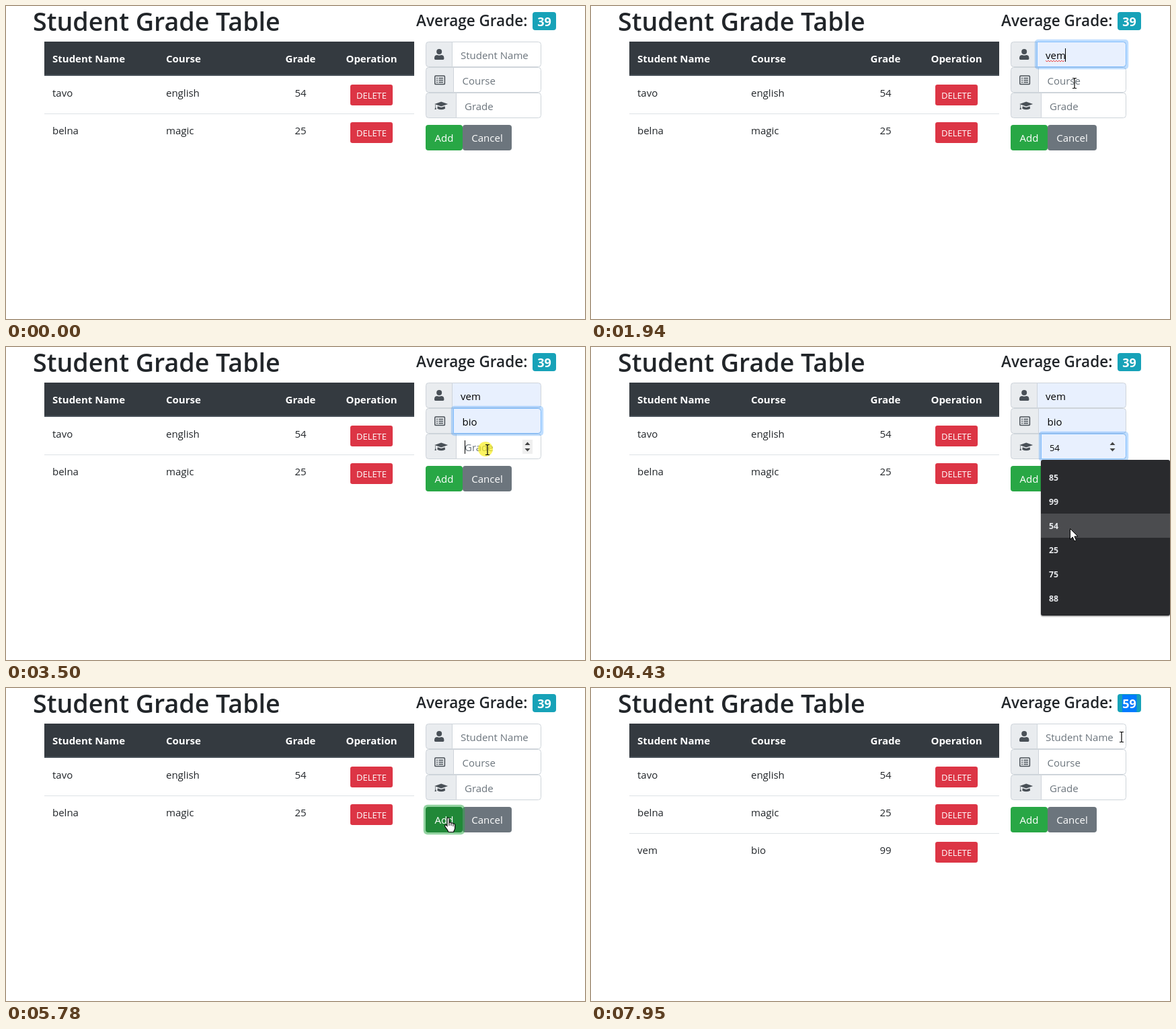
An HTML page that plays this animation: 861x466 px, repeating every 8 s.

```html
<!DOCTYPE html>
<html lang="en">
<head>
<meta charset="utf-8">
<title>Student Grade Table</title>
<style>
  html, body { margin: 0; width: 100%; height: 100%; overflow: hidden; background: #fff; }
  svg { display: block; width: 861px; height: 466px; font-family: "Open Sans", "Noto Sans", sans-serif; }
  text { white-space: pre; }
</style>
</head>
<body>
<svg id="stage" viewBox="0 0 861 466" xmlns="http://www.w3.org/2000/svg"></svg>
<script>
const LOOP = 8000;
const INK = '#212529';

// Form fields: box, texts, suggestion list and the times of each event
const fields = [
  { y: 53, x: 663, tx: 676, hint: 'Student Name', value: 'vem', caret: 705.5,
    focus: 760, pick: 1550, blur: 2170,
    list: ['tavo', 'tul', 'oru', 'vem', 'belna', 'tirvo'] },
  { y: 91, x: 665, tx: 678.5, hint: 'Course', value: 'bio', caret: 701.5,
    focus: 2170, pick: 3030, blur: 3580,
    list: ['math', 'history', 'bio', 'english', 'magic', 'art'] },
  { y: 129, x: 669, tx: 682, hint: 'Grade', value: '99', caret: 699.5,
    focus: 3580, pick: 4890, blur: 5690,
    list: ['85', '99', '54', '25', '75', '88'] }
];
const rows = [['tavo', 'english', '54'], ['belna', 'magic', '25'], ['vem', 'bio', '99']];
const ENTER = 70, CLEARED = 5780, ADDED = 6310, ADD_FOCUS = 5690, ADD_BLUR = 7490;

// Pointer moves: start, end, steps, x, y
const away = [-99, -99];
const home = [545, 188];
const moves = [
  [ENTER, 610, 8, 729, 85],
  [1000, 1300, 5, 716, 228],
  [1620, 1940, 5, 719, 115],
  [2240, 2550, 5, 714, 192],
  [2720, 2780, 2, 714, 229],
  [3110, 3340, 4, 716, 153],
  [3800, 4110, 5, 712, 298],
  [4430, 4430, 1, 712, 270],
  [4510, 4510, 1, 712, 232],
  [4960, 5600, 9, 657.5, 193],
  [6700, 7330, 9, 820, 14],
  [7490, 7490, 1, 815, 16],
  [7560, 7640, 2, 788, 24],
  [7720, 7950, 4, 789, 73]
];
const presses = [[690, 760], [1470, 1550], [2090, 2170], [2950, 3030], [3500, 3580],
                 [4810, 4890], [5690, 5780], [7410, 7640]];

const between = (t, a, b) => t >= a && t < b;
const inside = ([px, py], x, y, w, h) => between(px, x, x + w) && between(py, y, y + h);

// Two-step fade, one step per screen update
const ramp = (t, from) => t < from ? 0 : Math.min(1, (Math.floor((t - from) / 68) + 1) / 2);

const rect = (x, y, w, h, fill, r = 0, more = '') =>
  `<rect x="${x}" y="${y}" width="${w}" height="${h}" rx="${r}" fill="${fill}" ${more}/>`;

const text = (x, y, str, size = 15, fill = INK, weight = 400, anchor = 'start') =>
  `<text x="${x}" y="${y}" font-size="${size}" fill="${fill}" font-weight="${weight}" text-anchor="${anchor}">${str}</text>`;

const path = (d, fill, more = '') => `<path d="${d}" fill="${fill}" ${more}/>`;

// Box with separate left and right corner radii
function sideBox(x, y, w, h, l, r, fill, stroke) {
  const d = `M${x + l} ${y}h${w - l - r}q${r} 0 ${r} ${r}v${h - 2 * r}q0 ${r} ${-r} ${r}` +
            `h${l + r - w}q${-l} 0 ${-l} ${-l}v${2 * l - h}q0 ${-l} ${l} ${-l}z`;
  return path(d, fill, `stroke="${stroke}"`);
}

const icons = [
  `<g fill="#495057"><circle cx="644.2" cy="68" r="4"/>
   <path d="M637 78.6v-1.2q0-4.4 4.4-4.4q2.8 1 5.6 0q4.4 0 4.4 4.4v1.2q0 1.4-1.5 1.4h-11.4q-1.5 0-1.5-1.4z"/></g>`,
  `<g fill="none" stroke="#495057" stroke-width="1.5"><rect x="637.8" y="104" width="14.6" height="12.6" rx="1.2"/>
   <path d="M640.2 107.4h1.8m1.4 0h6.6M640.2 110.4h1.8m1.4 0h6.6M640.2 113.4h1.8m1.4 0h6.6"/></g>`,
  `<g fill="#495057"><path d="M637.2 146l10-3.6l10 3.6l-10 3.6z"/>
   <path d="M641.8 149.2l5.4 1.9l5.4-1.9l.5 3.6q-5.9 3-11.8 0z"/>
   <path d="M639 147v3.5l.9 3.5h-2.4l.9-3.5v-3.5z"/></g>`
];

function pointer(t) {
  if (t < ENTER) return away;
  let [x, y] = home;
  for (const [start, end, n, tx, ty] of moves) {
    if (t < start) break;
    const part = end > start ? (t - start) / (end - start) : 1;
    const k = Math.min(n, Math.floor(part * (n - 1) + 0.1) + 1) / n;
    const e = k * k * (3 - 2 * k);
    x += (tx - x) * e;
    y += (ty - y) * e;
  }
  return [x, y];
}

function cursor(p, listTop, rowCount) {
  const at = `transform="translate(${p[0].toFixed(1)} ${p[1].toFixed(1)})"`;
  const overButton = inside(p, 624, 177, 128, 38) ||
    rows.slice(0, rowCount).some((_, i) => inside(p, 512, 117 + 56 * i, 63, 31));
  const overText = inside(p, 663, 53, 133, 114) || inside(p, 783, 9, 35, 27);
  if (overButton && !listTop) {
    return `<g ${at}>` + path('M-1.5 1.5a1.5 1.5 0 0 1 3 0v6c1-1 3-.7 3 .8c1-.8 3-.4 3 1c1.2-.6 2.6 0 2.6 1.5v5' +
      'c0 2-1.6 3.5-2 5.7h-7.6c-.5-2.5-3-4.5-5-8c-1.5-2.5 1-3.8 3-1.2z', '#fff', 'stroke="#000" stroke-width="1.1"') +
      path('M1.5 8v4M4.5 9v3M7.5 10v3', 'none', 'stroke="#000"') + '</g>';
  }
  if (overText && !(listTop && p[1] > listTop)) {
    return `<g ${at}>` + path('M-3 -7.5h2.2l.8 .8l.8-.8h2.2M0-7v14M-3 7.5h2.2l.8-.8l.8 .8h2.2', 'none',
      'stroke="#000" stroke-width="1.2"') + '</g>';
  }
  return `<g ${at}>` + path('M.5 .5v16l3.7-3.5l2.6 5.9l2.7-1.2l-2.6-5.7h5.1z', '#fff', 'stroke="#000"') + '</g>';
}

function table(p, rowCount) {
  let s = rect(57, 53, 550, 51, '#343a40') + rect(57, 102, 550, 2, '#454d55');
  s += text(69, 84, 'Student Name', 15, '#fff', 700) + text(238, 84, 'Course', 15, '#fff', 700) +
       text(438, 84, 'Grade', 15, '#fff', 700, 'middle') + text(543.5, 84, 'Operation', 15, '#fff', 700, 'middle');
  rows.slice(0, rowCount).forEach(([name, course, grade], i) => {
    const y = 56 * i;
    const hover = inside(p, 512, 117 + y, 63, 31);
    if (i) s += rect(57, 104 + y, 550, 1, '#dee2e6');
    s += text(69, 135 + y, name) + text(238, 135 + y, course) + text(438, 135 + y, grade, 15, INK, 400, 'middle');
    s += rect(512, 117 + y, 63, 31, hover ? '#c82333' : '#dc3545', 3.2) +
         text(543.5, 138 + y, 'DELETE', 13, '#fff', 400, 'middle');
  });
  return s;
}

const isOpen = (f, t) => between(t, f.focus, f.pick);

function hovered(f, p) {
  const i = Math.floor((p[1] - f.y - 47) / 36);
  return p[0] >= f.x && i >= 0 && i < f.list.length ? i : -1;
}

function input(f, t, p) {
  const glow = ramp(t, f.focus) - ramp(t, f.blur);
  const filled = between(t, f.pick, CLEARED);
  const pick = isOpen(f, t) ? hovered(f, p) : -1;
  const preview = pick >= 0;
  const w = 796 - f.x;
  const base = f.y + 26;
  let s = '';
  if (glow > 0) s += rect(f.x - 3.2, f.y - 3.2, w + 6.4, 44.4, '#007bff', 5, `opacity="${glow * .25}"`);
  s += sideBox(f.x + .5, f.y + .5, w - 1, 37, 0, 4, filled || preview ? '#e8f0fe' : '#fff', '#ced4da');
  if (glow > 0) s += `<g opacity="${glow}">` + sideBox(f.x + .5, f.y + .5, w - 1, 37, 0, 4, 'none', '#80bdff') + '</g>';

  if (filled) s += text(f.tx, base, f.value, 15, '#000');
  else if (preview) s += text(f.tx, base, f.list[pick], 13, '#000');
  else s += text(f.tx, base, f.hint, 15, '#6c757d');

  if (f === fields[0] && filled && t < f.blur) {
    let d = `M676 ${base + 2}`;
    for (let i = 0; i < 14; i++) d += `l2 ${i % 2 ? -2 : 2}`;
    s += path(d, 'none', 'stroke="#e33" stroke-width=".9"');
  }
  if (!preview && between(t, f.focus - 80, f.blur - 80)) {
    s += rect((filled ? f.caret : f.tx + .5) - .5, f.y + 10, 1, 20, '#000');
  }
  if (f === fields[2] && between(t, 3340, ADD_FOCUS)) {
    if (!filled && !preview) s += rect(768, 138, 15, 21, '#efefef');
    s += path('M771.5 146l4-4.4l4 4.4zM771.5 151l4 4.4l4-4.4z', '#444');
  }
  return s;
}

function dropdown(f, p) {
  const top = f.y + 39, hot = hovered(f, p);
  let s = rect(f.x - .5, top + 1, 193, 233, '#000', 4, 'opacity=".22"') + rect(f.x, top, 192, 232, '#292a2d', 3);
  f.list.forEach((item, i) => {
    const y = top + 8 + 36 * i;
    if (i === hot) s += rect(f.x, y, 192, 36, '#4b4c4f');
    s += text(f.x + 12, y + 22.5, item, 12.3, '#e8eaed', 700);
  });
  return s;
}

function form(t, p) {
  let s = '';
  fields.forEach((f, i) => {
    s += sideBox(624.5, f.y + .5, f.x - 624, 37, 4, 0, '#e9ecef', '#ced4da') + icons[i];
  });
  const focused = f => t >= f.focus && t < f.blur;
  [...fields].sort((a, b) => focused(a) - focused(b)).forEach(f => { s += input(f, t, p); });

  const open = fields.find(f => isOpen(f, t));
  const overAdd = !open && inside(p, 624, 177, 55, 38);
  const overCancel = !open && inside(p, 679, 177, 73, 38);
  const glow = ramp(t, ADD_FOCUS) - ramp(t, ADD_BLUR);
  s += rect(679, 177, 73, 38, overCancel ? '#5a6268' : '#6c757d', 4) + text(715.5, 202, 'Cancel', 15, '#fff', 400, 'middle');
  if (glow > 0) s += rect(620.8, 173.8, 61.4, 44.4, '#28a745', 6, `opacity="${glow * .5}"`);
  s += rect(624, 177, 55, 38, overAdd || glow > 0 ? '#218838' : '#28a745', 4) +
       text(651.5, 202, 'Add', 15, '#fff', 400, 'middle');
  if (open) s += dropdown(open, p);
  return s;
}

function badge(t) {
  const from = t >= 7640 ? 790 : 800.5;
  return rect(783, 9, 35, 27, '#17a2b8', 4) +
    (t >= 7560 ? rect(from, 10, 811.5 - from, 26, '#007bff') : '') +
    text(800.5, 30, t < ADDED ? '39' : '59', 18, '#fff', 700, 'middle');
}

function scene(t) {
  const p = pointer(t);
  const rowCount = t < ADDED ? 2 : 3;
  const open = fields.find(f => isOpen(f, t));
  let s = rect(0, 0, 861, 466, '#fff') +
    text(40, 37, 'Student Grade Table', 37.6, INK, 600) +
    text(610, 30, 'Average Grade:', 22.5, INK, 600) +
    badge(t) + table(p, rowCount) + form(t, p);
  if (presses.some(([a, b]) => between(t, a, b))) {
    s += `<circle cx="${p[0] - 3}" cy="${p[1] - 1}" r="11" fill="#faf01e" opacity=".7"/>`;
  }
  return s + cursor(p, open && open.y + 39, rowCount);
}

const stage = document.getElementById('stage');
const began = performance.now();
let shown = '';

function draw(now) {
  const next = scene(Math.max(0, now - began) % LOOP);
  if (next !== shown) stage.innerHTML = shown = next;
  requestAnimationFrame(draw);
}
draw(began);
</script>
</body>
</html>
```
